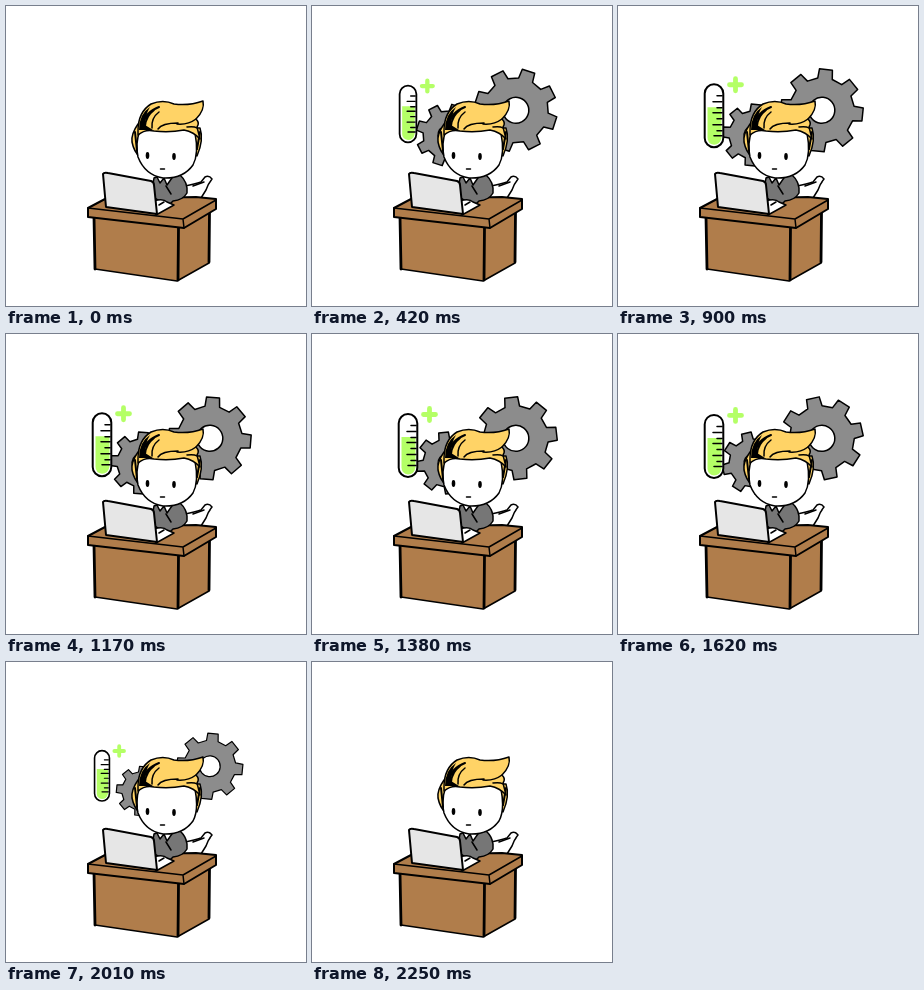
An HTML page for the animation above (2.7 s loop, 300 px wide and 300 px high).

```html
<!DOCTYPE html>
<html>
<head>
<meta charset="utf-8">
<style>
  html, body { margin: 0; width: 100%; height: 100%; overflow: hidden; background: #fff; }
  svg { display: block; width: 100vw; height: 100vh; }
  .ink { stroke: #000; stroke-width: 1.5; stroke-linejoin: round; stroke-linecap: round; }
  .line { fill: none; }
  .bold { stroke-width: 2; }
  .heavy { stroke-width: 2.8; }
  .gear { fill: #8c8c8c; fill-rule: evenodd; }
  .hair { fill: #ffd366; }
  .wood { fill: #b07d4b; }
  .lime { fill: #b4ff66; }
</style>
</head>
<body>
<svg viewBox="0 0 300 300">
  <path id="bigGear" class="ink gear"/>
  <path id="smallGear" class="ink gear"/>

  <g id="gauge">
    <rect x="-9.3" y="-31.5" width="18.6" height="63" rx="9.3" fill="#fff"/>
    <path class="lime" d="M-6.5-8.5H7.5V22Q6 29 0 29Q-6.5 28-6.5 22Z"/>
    <rect class="ink line bold" x="-9.3" y="-31.5" width="18.6" height="63" rx="9.3"/>
    <path class="ink line" d="M8-20H3M8-14H-1M8-8H3M8-3H-1M8 3H3M8 9H-1M8 15H3M8 20H0"/>
    <path d="M15.5-31H27.5M21.5-37V-25" stroke="#b4ff66" stroke-width="4.8" stroke-linecap="round"/>
  </g>

  <!-- chair -->
  <path class="ink" fill="#fff" d="M179 180Q189 178 195 176L199 171Q203 169 206 173Q202 178 200 184L195 192L178 192Z"/>
  <path class="ink line" d="M187 180L198 176"/>

  <!-- desk -->
  <path class="wood" d="M88 210L89 263L172 275L203 257V204L174 220Z"/>
  <path class="ink line" d="M89 263L171 275L203 257"/>
  <path class="ink line heavy" d="M88 211L89 263M172.5 221L172 274M203.5 206L203 256"/>
  <path class="ink bold wood" d="M82 202L99 193L190 191L210 193L210 203L178 222L82 211Z"/>
  <path class="ink line" d="M82 202L177 213L210 194M177 213L178 222"/>

  <!-- jacket -->
  <path class="ink" fill="#767676" d="M148 172Q160 167 174 169Q182 176 181 187Q177 194 167 195L162 200L145 190Z"/>
  <path class="ink" fill="#fff" d="M150 169L154 177L158 172L161 179L168 169Z"/>
  <path class="ink line" d="M160 180L165 188"/>

  <!-- head -->
  <path class="ink hair" d="M132 118Q125 128 126 136Q128 146 134 151L138 125Z"/>
  <path class="ink hair" d="M185 122L194 122Q198 134 191 150L186 145Z"/>
  <path class="ink" fill="#fff" d="M134 124Q129 138 132 151Q139 169 157 172Q177 173 187 159Q193 148 189 127L184 121L138 122Z"/>
  <path class="ink line bold" d="M129 126L131 145M194 126L191 143"/>
  <path class="ink hair" d="M132 125Q132 106 145 98Q157 93 168 98Q183 100 197 95Q199 104 190 113Q194 117 191 121L194 133Q188 126 178 124Q163 127 148 125Q139 123 132 129Z"/>
  <path class="ink line" d="M190 113Q182 119 171 118M146 122Q145 112 153 106M152 123Q156 117 172 117M181 121Q188 120 191 122"/>
  <path class="ink line bold" d="M136 120Q139 106 153 101M139 120Q140 110 148 104"/>
  <path d="M133 124Q133 108 144 101Q139 109 139 119L147 124Z"/>
  <ellipse cx="141.5" cy="149.5" rx="1.8" ry="3.4"/>
  <ellipse cx="168" cy="150.5" rx="1.8" ry="3.4"/>
  <path class="ink line" d="M154.5 163H158.5"/>

  <!-- laptop and hands -->
  <path class="ink" fill="#fff" d="M148 195Q157 192 161 196L168 199L150 209Z"/>
  <path class="ink line" d="M153 199L158 196"/>
  <path class="ink bold" fill="#e6e6e6" d="M97 168Q98 166 102 167L145 175Q148 176 148 179L151 208L100 201Z"/>
</svg>
<script>
const DURATION = 2700, STEP = 30, FADE = 300, GAUGE_DELAY = 150, END = 2250;
const byId = id => document.getElementById(id);

function gearPath(outer, root, hole) {
  const point = (radius, degrees) => {
    const a = degrees * Math.PI / 180;
    return `${radius * Math.cos(a)} ${radius * Math.sin(a)}`;
  };
  const points = [];
  for (let a = 0; a < 360; a += 45)
    points.push(point(root, a - 13), point(outer, a - 9), point(outer, a + 9), point(root, a + 13));
  return `M${points.join('L')}ZM${hole} 0A${hole} ${hole} 0 1 0 ${-hole} 0A${hole} ${hole} 0 1 0 ${hole} 0Z`;
}

function place(id, x, y, scale, angle = 0) {
  byId(id).setAttribute('transform', `translate(${x} ${y}) rotate(${angle}) scale(${scale})`);
}

// Grows from nothing after a delay and shrinks away before END.
const zoom = (t, delay) => Math.max(0, Math.min(1, (t - delay) / FADE, (END - t) / FADE));

function draw(now) {
  const t = Math.floor(now % DURATION / STEP) * STEP;
  const angle = 0.162 * t - 5;
  place('bigGear', 203.8, 104.3, zoom(t, 0), angle);
  place('smallGear', 135, 129, zoom(t, 0), angle);
  place('gauge', 96, 106.4 + 0.0037 * t, zoom(t, GAUGE_DELAY));
  requestAnimationFrame(draw);
}

byId('bigGear').setAttribute('d', gearPath(41.5, 32.5, 13));
byId('smallGear').setAttribute('d', gearPath(31, 24, 9));
draw(0);
</script>
</body>
</html>
```
